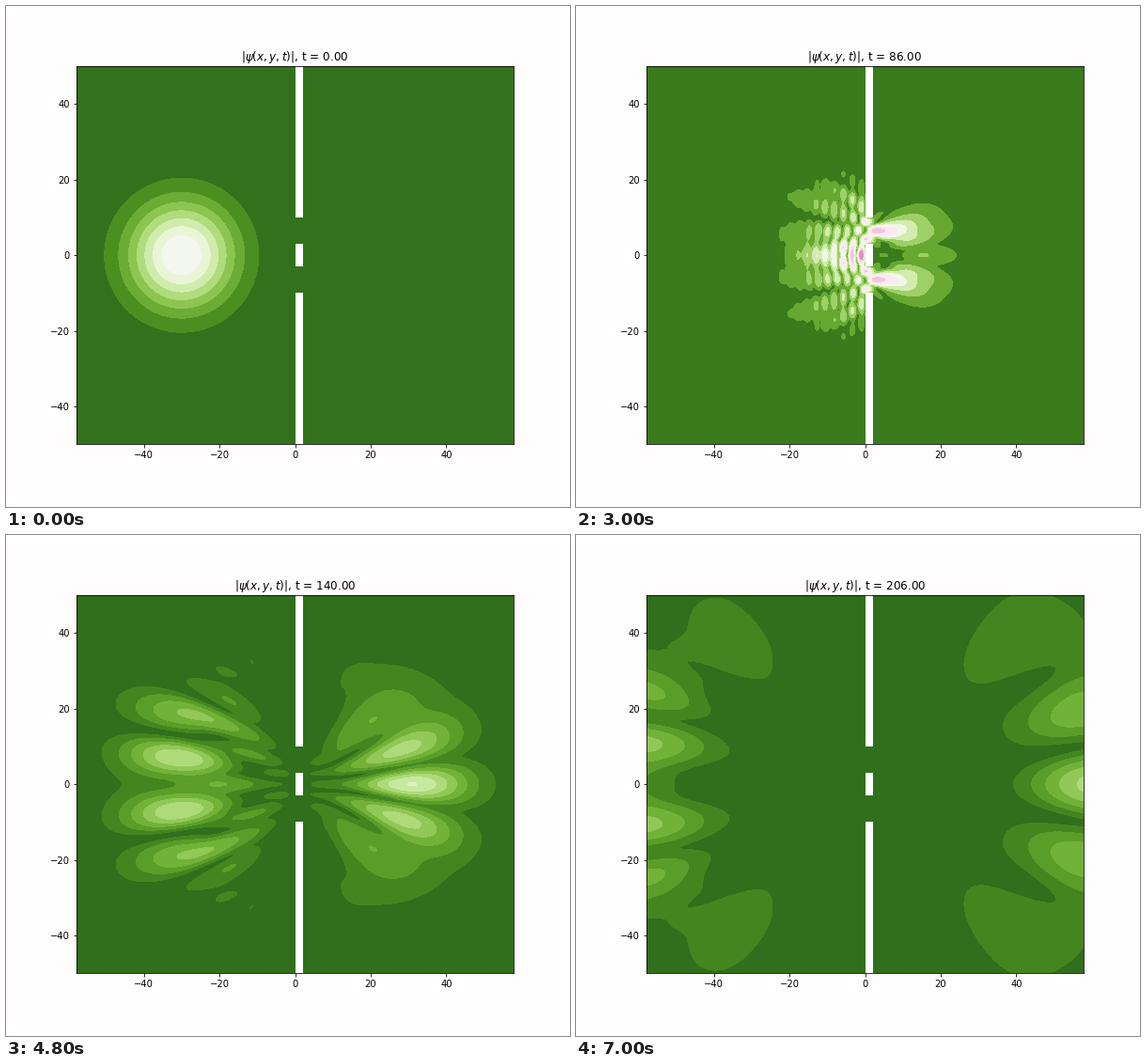
Write a matplotlib script that moves like this. It is 600 by 533 pixels and loops after 7.1 s.

```python
import numpy as np
import matplotlib.pyplot as plt
from matplotlib.animation import FuncAnimation
from matplotlib.patches import Rectangle
from matplotlib.ticker import MaxNLocator

# Stage
DPI = 64
WIDTH, HEIGHT = 600, 533
PX = 72 / DPI            # points per pixel
FRAMES, INTERVAL = 71, 100

# Wave packet, in units where hbar = 1
MASS = 3.0
K0 = 4 / 3
SIGMA = 10.0
START_X = -30.0
PEAK = 1 / np.sqrt(2 * np.pi * SIGMA**2)

# Double slit: wall between x = 0 and WALL, open for GAP_IN < |y| < GAP_OUT
WALL = 2.0
GAP_IN, GAP_OUT = 3.0, 10.0
WALL_V = 3.0

# Grid and time stepping
DX, NX, NY = 0.5, 320, 288
DT = 0.4
SNAP = 2                 # time between stored states
STEPS = round(SNAP / DT)

VMAX = 0.078
MIN_TOP = 0.0245         # smallest range the contour levels span


def axis(n):
    return (np.arange(n) + 0.5 - n / 2) * DX


def snapshot(frame):
    """Index of the stored state shown in a frame."""
    return max(0, (3 * (frame - 1)) // 2)


def simulate(count):
    """Split-step solution of the free packet hitting the wall."""
    gx, gy = np.meshgrid(x, y)
    psi = PEAK * np.exp(-((gx - START_X)**2 + gy**2) / (2 * SIGMA**2) + 1j * K0 * gx)
    in_wall = (gx > 0) & (gx < WALL)
    is_gap = (abs(gy) > GAP_IN) & (abs(gy) < GAP_OUT)
    kick = np.exp(-1j * DT * WALL_V * (in_wall & ~is_gap))
    kx = 2 * np.pi * np.fft.fftfreq(NX, DX)
    ky = 2 * np.pi * np.fft.fftfreq(NY, DX)
    drift = np.exp(-1j * DT * (kx[None, :]**2 + ky[:, None]**2) / (2 * MASS))

    states = [abs(psi)]
    for _ in range(count - 1):
        for _ in range(STEPS):
            psi = np.fft.ifft2(np.fft.fft2(psi) * drift) * kick
        states.append(abs(psi))
    return states


x, y = axis(NX), axis(NY)
states = simulate(snapshot(FRAMES - 1) + 1)

plt.rcParams["font.family"] = "DejaVu Sans"
plt.rcParams["mathtext.fontset"] = "dejavusans"

fig = plt.figure(figsize=(WIDTH / DPI, HEIGHT / DPI), dpi=DPI, facecolor="#fffdfe")
ax = fig.add_axes([0.125, 0.125, 0.775, 0.755])
half_y = 50
half_x = half_y * (0.775 * WIDTH) / (0.755 * HEIGHT)
ticks = range(-40, 41, 20)

for spine in ax.spines.values():
    spine.set_linewidth(0.8 * PX)
ax.tick_params(length=3.5 * PX, width=0.8 * PX, pad=3.5 * PX, labelsize=10 * PX)
title = ax.set_title("", fontsize=12 * PX, pad=6 * PX)

for low, high in ((-half_y, -GAP_OUT), (-GAP_IN, GAP_IN), (GAP_OUT, half_y)):
    ax.add_patch(Rectangle((0, low), WALL, high - low, fc="white", lw=0, zorder=2))

locator = MaxNLocator(8, min_n_ticks=1)
shown = []


def draw(frame):
    while shown:
        shown.pop().remove()
    index = snapshot(frame)
    z = states[index]
    levels = locator.tick_values(0, max(z.max(), MIN_TOP))
    shown.append(ax.contourf(x, y, z, levels=levels, cmap="PiYG_r",
                             vmin=0, vmax=VMAX, zorder=1))
    ax.set(xlim=(-half_x, half_x), ylim=(-half_y, half_y), xticks=ticks, yticks=ticks)
    title.set_text(rf"$|\psi(x,y,t)|$, t = {index * SNAP:.2f}")
    return []


anim = FuncAnimation(fig, draw, frames=FRAMES, init_func=lambda: draw(0),
                     interval=INTERVAL, repeat=True, repeat_delay=0, blit=False)
plt.show()
```
